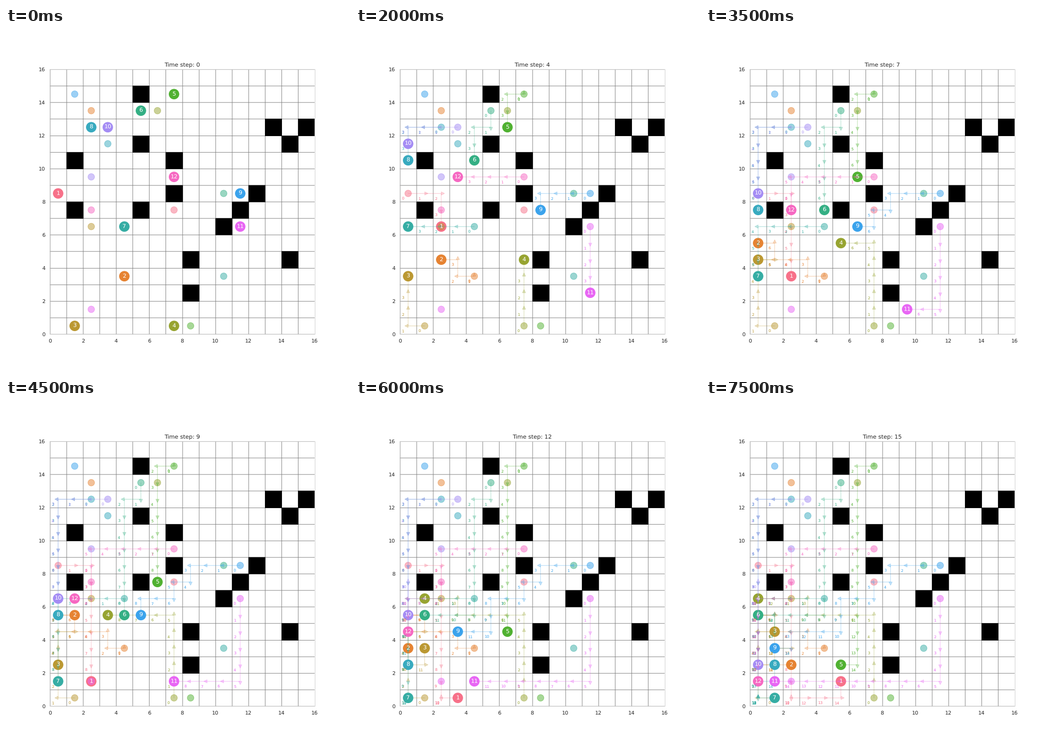
Write a matplotlib script that moves like this. It is 748 px wide and 748 px high and loops after 8 s.

```python
import math

import matplotlib.pyplot as plt
from matplotlib.animation import FuncAnimation
from matplotlib.patches import Circle, Rectangle

SIZE = 16
STEPS = 16

plt.rcParams.update({
    "font.family": "DejaVu Sans",
    "font.size": 12,
    "text.color": "0.15",
    "text.hinting": "none",
    "axes.titlesize": 12,
    "patch.linewidth": 1,
    "xtick.labelsize": 11, "ytick.labelsize": 11,
    "xtick.color": "0.15", "ytick.color": "0.15",
    "xtick.major.size": 6, "ytick.major.size": 6,
    "xtick.bottom": False, "ytick.left": False,
})

WALLS = [(1, 7), (1, 10), (5, 7), (5, 11), (5, 14), (7, 8), (7, 10), (8, 2),
         (8, 4), (10, 6), (11, 7), (12, 8), (13, 12), (14, 4), (14, 11), (15, 12)]

MOVES = {"U": (0, 1), "D": (0, -1), "L": (-1, 0), "R": (1, 0), ".": (0, 0)}

# colour, start cell, goal cell, one move per step
AGENTS = [
    ("#f77189", (0, 8), (7, 7), "RR" + "D" * 8 + ".RRRU"),
    ("#e68332", (4, 3), (2, 13), ".LULLUL.RLDDDRR"),
    ("#bb9832", (1, 0), (2, 6), "LUUUURLDD.RURLU"),
    ("#97a431", (7, 0), (6, 13), "UUUUULLLLULLL.."),
    ("#50b131", (7, 14), (8, 0), ".L" + "D" * 12 + "L"),
    ("#34af84", (5, 13), (10, 8), "DL" + "D" * 7 + "LLLDUL"),
    ("#36ada4", (4, 6), (10, 3), "LLLL" + "D" * 6 + "....R"),
    ("#38aabf", (2, 12), (3, 11), "LL" + "D" * 11 + "RU"),
    ("#3ba3ec", (11, 8), (1, 14), "LLLDLDLLDDLLLDL"),
    ("#a48cf4", (3, 12), (2, 9), "LLL" + "D" * 6 + "UDDDDD"),
    ("#e866f4", (11, 6), (2, 1), "DDDDD" + "L" * 10),
    ("#f668c2", (7, 9), (2, 7), "LLLLLDDDLLDDDDD"),
]

# Cell edges sit on the pixel centres of a 1000 px layout.
CELL, LEFT, BOTTOM = 770 / SIZE, 127.5, 890


def align(px):
    return math.floor(px + 0.5) + 0.5


def edge_x(i):
    return (align(LEFT + CELL * i) - LEFT) / CELL


def edge_y(i):
    return (BOTTOM - align(BOTTOM - CELL * i)) / CELL


def box(x, y, n, **style):
    x0, y0 = edge_x(x), edge_y(y)
    return Rectangle((x0, y0), edge_x(x + n) - x0, edge_y(y + n) - y0,
                     snap=False, **style)


def center(cell):
    return cell[0] + 0.5, cell[1] + 0.5


class Agent:
    def __init__(self, ax, name, color, start, goal, moves):
        for cell in (start, goal):
            ax.add_patch(Circle(center(cell), 0.2, color=color, alpha=0.5))
        self.path = [center(start)]
        self.trail = []
        for t, move in enumerate(moves):
            x, y = self.path[-1]
            dx, dy = MOVES[move]
            arrow = ax.arrow(x, y, dx, dy, head_width=0.2, head_length=0.2,
                             color=color, alpha=0.3)
            label = ax.text(x - 0.4, y - 0.4, str(t), color=color, fontsize=8)
            self.trail.append((arrow, label))
            self.path.append((x + dx, y + dy))
        self.disc = ax.add_patch(Circle(self.path[0], 0.3, color=color))
        self.name = ax.text(*self.path[0], name, color="white",
                            ha="center", va="center")

    def show(self, step):
        for t, pair in enumerate(self.trail):
            for artist in pair:
                artist.set_visible(t < step)
        self.disc.center = self.path[step]
        self.name.set_position(self.path[step])


fig, ax = plt.subplots(figsize=(10, 10), dpi=74.8)
ax.set_aspect("equal")
ax.set_xticks(range(0, SIZE + 1, 2))
ax.set_yticks(range(0, SIZE + 1, 2))
ax.spines[:].set_visible(False)

grid = dict(color="gray", linewidth=1, zorder=0.5, snap=False)
for i in range(SIZE + 1):
    ax.axvline(edge_x(i), **grid)
    ax.axhline(edge_y(i), **grid)
for x, y in WALLS:
    ax.add_patch(box(x, y, 1, color="black"))
agents = [Agent(ax, str(i), *spec) for i, spec in enumerate(AGENTS, 1)]
ax.add_patch(box(0, 0, SIZE, fill=False, edgecolor="0.8", zorder=2.5,
                 clip_on=False))
ax.set_xlim(0, SIZE)
ax.set_ylim(0, SIZE)
title = ax.set_title("")


def update(step):
    title.set_text(f"Time step: {step}")
    for agent in agents:
        agent.show(step)
    return []


anim = FuncAnimation(fig, update, frames=STEPS, interval=500,
                     repeat=True, repeat_delay=0)
plt.show()
```
